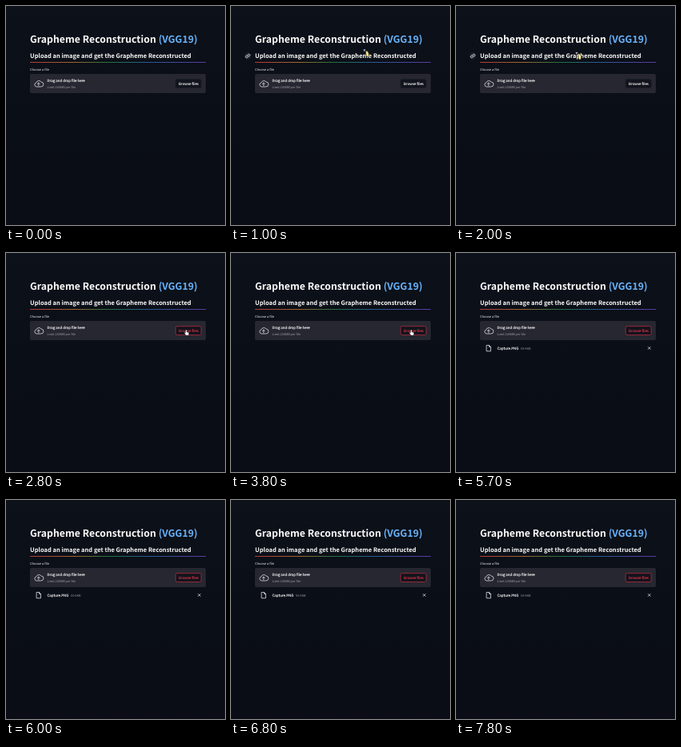
An HTML page for the animation above (8 s loop, 274 by 274 pixels).

```html
<!DOCTYPE html>
<html lang="en">
<head>
<meta charset="utf-8">
<style>
html, body { margin: 0; width: 100%; height: 100%; overflow: hidden; background: #0a0e16; }
svg { display: block; width: 100vw; height: 100vh; }
text { font-family: "Noto Sans CJK JP", "Noto Sans CJK SC", "Noto Sans CJK", "Open Sans", sans-serif; fill: #fafafa; white-space: pre; text-rendering: geometricPrecision; }
.bold { font-weight: 700; }
.medium { stroke: #fafafa; stroke-width: .14; }
.dim { fill: #9fa1a9; }
.line { fill: none; stroke: #c9cad1; stroke-width: .9; stroke-linecap: round; stroke-linejoin: round; }
</style>
</head>
<body>
<svg viewBox="0 0 274 274">
  <defs>
    <linearGradient id="page" x2="0" y2="1">
      <stop stop-color="#0d1119"/><stop offset=".5" stop-color="#0a0e16"/><stop offset="1" stop-color="#0a0d15"/>
    </linearGradient>
    <linearGradient id="rainbow" gradientUnits="userSpaceOnUse" x1="30" x2="250">
      <stop stop-color="#b03a40"/><stop offset=".25" stop-color="#a0652c"/><stop offset=".45" stop-color="#207043"/>
      <stop offset=".68" stop-color="#2a5898"/><stop offset="1" stop-color="#5a3ba0"/>
    </linearGradient>
  </defs>
  <rect width="274" height="274" fill="url(#page)"/>

  <text class="bold" x="30" y="45.7" font-size="12.3">Grapheme Reconstruction <tspan fill="#68b3fc">(VGG19)</tspan></text>
  <text class="bold" x="30" y="65.3" font-size="7.55">Upload an image and get the Grapheme Reconstructed</text>
  <rect x="30" y="70" width="220" height="1" fill="url(#rainbow)"/>
  <g id="link">
    <circle cx="21" cy="62.5" r="4.2" fill="#1c2029"/>
    <path class="line" transform="rotate(-35 21 62.5)" d="M20.4 61.2h-1.2a1.3 1.3 0 0 0 0 2.6h1.2m1.2-2.6h1.2a1.3 1.3 0 0 1 0 2.6h-1.2m-1.6-1.3h2"/>
  </g>

  <text x="30" y="81" font-size="4.05">Choose a file</text>
  <rect x="30" y="85" width="220" height="24" rx="2" fill="#262730"/>
  <path class="line" d="M38.1 101a2.6 2.6 0 0 1-.2-5.1 3.5 3.5 0 0 1 6.2-.8 2.9 2.9 0 0 1-.2 5.9zm2.7-1.4v-3.5m-1.5 1.5 1.5-1.5 1.5 1.5"/>
  <text class="medium" x="51.5" y="95" font-size="4.46">Drag and drop file here</text>
  <text class="dim" x="51.5" y="102.6" font-size="3.87">Limit 200MB per file</text>
  <rect id="button" x="212.2" y="91.7" width="32" height="10.8" rx="1.8" fill="#11141c" stroke-width=".9"/>
  <text id="browse" x="228.5" y="98.7" font-size="4.46" text-anchor="middle" stroke-width=".1">Browse files</text>

  <g id="file">
    <path class="line" d="M38.5 115.5h3.2l1.8 1.9v5.4h-5zm3 0v2.1h2"/>
    <text class="medium" x="51.5" y="120.6" font-size="4.46">Capture.PNG</text>
    <text class="dim" x="81" y="120.6" font-size="3.87">59.9KB</text>
    <path class="line" d="M240.4 117.6l2.8 2.8m0-2.8l-2.8 2.8"/>
  </g>

  <g id="arrow">
    <path d="M-.3-.3 2.8 0 .4 2.6z" fill="#b9c6d4"/>
    <path d="M2.6 1.4 5 2 6.6 5.2 6.4 8.6 4.4 9.2 2.8 7z" fill="#d8c76b" stroke="#262719" stroke-width=".5"/>
    <path d="M3.7 2.8 5.2 7.8" stroke="#f5edb9" stroke-width="1.3"/>
  </g>
  <path id="hand" d="M0 .4c.7 0 .8.5.8 1v1.7l1.7.4c.7.2.9.6.8 1.2l-.4 2.5H-.3l-1.9-2.9c-.3-.7.4-1 .9-.6l.5.6V1.4C-.8.8-.5.4 0 .4z" fill="#fff" stroke="#15161c" stroke-width=".3"/>
</svg>
<script>
const LOOP = 8000;
const el = id => document.getElementById(id);
const show = (id, on) => el(id).setAttribute("visibility", on ? "visible" : "hidden");

// Pointer stops: time, x, y
const path = [
  [100, 274, 108], [600, 204, 58], [800, 204, 58], [1000, 166, 54.5], [1600, 150, 58],
  [2150, 150, 58], [2700, 225.5, 95.8], [4950, 225.5, 95.8], [5250, 96.5, 128.5], [5600, 96.5, 128.5]
];
const ease = u => u * u * (3 - 2 * u);

function pointerAt(t) {
  const i = path.findIndex(p => p[0] > t);
  if (i < 1) return null;
  const [a, b] = [path[i - 1], path[i]];
  const u = ease((t - a[0]) / (b[0] - a[0]));
  return [a[1] + (b[1] - a[1]) * u, a[2] + (b[2] - a[2]) * u];
}

function draw(now) {
  const t = now % LOOP;
  const pointer = pointerAt(t);
  const overButton = t >= 2600 && t < 5000;
  const active = t >= 2600;
  const textColor = active ? "#df3449" : "#fafafa";

  show("link", t >= 500 && t < 2300);
  show("file", t >= 5700);
  show("arrow", pointer && !overButton);
  show("hand", pointer && overButton);
  if (pointer) {
    for (const id of ["arrow", "hand"]) el(id).setAttribute("transform", `translate(${pointer})`);
  }
  el("button").setAttribute("stroke", active ? "#a5283e" : "#1b1e27");
  el("browse").style.fill = textColor;
  el("browse").style.stroke = textColor;
  requestAnimationFrame(draw);
}
requestAnimationFrame(draw);
</script>
</body>
</html>
```
